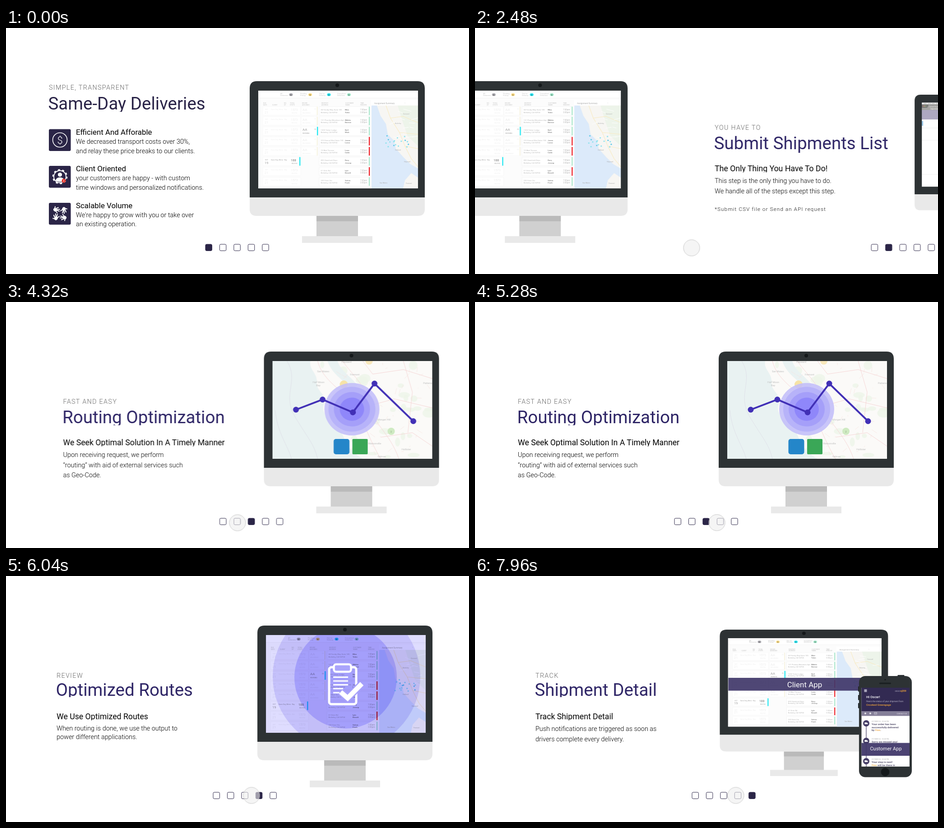
An HTML page for the animation above (8000 ms loop, 1026 px wide and 546 px high).

```html
<!DOCTYPE html>
<html lang="en">
<head>
<meta charset="utf-8">
<title>Delivery slides</title>
<style>
html, body { margin: 0; width: 100%; height: 100%; overflow: hidden; background: #fff; }
#stage { position: relative; width: 1026px; height: 546px; overflow: hidden; background: #fff; }
#track { position: absolute; left: 0; top: 0; width: 5130px; height: 546px; font-family: Roboto, sans-serif; animation: track 8s infinite; }
#cursor {
  position: absolute; left: -18.5px; top: -18.5px; width: 37px; height: 37px; box-sizing: border-box;
  border: 1px solid #c6c6c6; border-radius: 50%; background: rgba(238, 238, 238, .6);
  animation: cursor 8s infinite;
}
@keyframes track {
  0%, 29.515% { transform: translateX(0); }
  34.015%, 50.515% { transform: translateX(-1026px); }
  55.015%, 71.764% { transform: translateX(-2052px); }
  76.264% { transform: translateX(-3078px); }
  /* the last slide is cut off shortly before it settles */
  96.1125% { transform: translateX(-3078px); animation-timing-function: cubic-bezier(.271, .0945, .2885, .896); }
  100% { transform: translateX(-4092.8px); }
}
@keyframes cursor {
  0%, 4.375% { transform: translate(975px, -40px); animation-timing-function: ease-out; }
  6.5%, 8% { transform: translate(524.5px, 292.5px); animation-timing-function: ease-in-out; }
  13% { transform: translate(476.5px, 509.5px); animation-timing-function: ease-in-out; }
  16.5%, 20% { transform: translate(480.5px, 489.5px); }
  21.5%, 38% { transform: translate(479.5px, 487.5px); }
  40.5%, 44% { transform: translate(517.5px, 491.5px); }
  46%, 59% { transform: translate(512.5px, 489.5px); }
  64%, 65.5% { transform: translate(534.5px, 489.5px); }
  70%, 78% { transform: translate(543.5px, 486.5px); }
  82.5%, 88% { transform: translate(568.5px, 489.5px); }
  92.5%, 100% { transform: translate(577.5px, 486.5px); }
}
.multiply { mix-blend-mode: multiply; }
</style>
</head>
<body>
<div id="stage">
  <svg id="track" viewBox="0 0 5130 546"></svg>
  <div id="cursor"></div>
</div>
<script>
const INK = '#2b2547', TITLE = '#2e2566';

const text = (x, y, size, str, fill = '#222', weight = 400, more = '') =>
  `<text x="${x}" y="${y}" font-size="${size}" fill="${fill}" font-weight="${weight}" ${more}>${str}</text>`;
const rect = (x, y, w, h, fill, rx = 0, more = '') =>
  `<rect x="${x}" y="${y}" width="${w}" height="${h}" fill="${fill}" rx="${rx}" ${more}/>`;
const circle = (x, y, r, fill, more = '') => `<circle cx="${x}" cy="${y}" r="${r}" fill="${fill}" ${more}/>`;
const path = (d, fill, stroke = 'none', width = 1, more = '') =>
  `<path d="${d}" fill="${fill}" stroke="${stroke}" stroke-width="${width}" ${more}/>`;
const group = (transform, body, more = '') => `<g transform="${transform}" ${more}>${body}</g>`;
const centred = 'text-anchor="middle"';

let seed = 11;
const rnd = () => (seed = seed * 16807 % 2147483647) / 2147483647;

// Wording shared by all slides
const label = (y, str) => text(95, y, 14.4, str, '#666', 300, 'letter-spacing="1.3"');
const body = (x, y, str) => text(x, y, 14.4, str, '#000', 300);
const heading = (y, str, cut, fill = TITLE) =>
  text(93.5, y, 38.5, str, fill) + (cut ? rect(90, cut, 420, 10, '#fff') : '');
const subhead = str => text(95, 318, 17.7, str, '#000') + rect(90, 320.3, 420, 5, '#fff');

const dots = active => [0, 1, 2, 3, 4].map(i =>
  rect(442 + i * 31.45, 480, 14.4, 14.4, i === active ? INK : 'none', 2.5, `stroke="${INK}" stroke-width="1"`)).join('');

// Monitor of 388 x 359 with its screen at 19,21
const monitor = (x, y, sx, sy, screen) => group(`translate(${x} ${y}) scale(${sx} ${sy})`,
  rect(148, 299, 92, 46, '#d0d0d0') + rect(148, 299, 92, 12, '#bababa') + rect(116, 344, 156, 15, '#e9e9e9') +
  path('M0 258V16Q0 0 16 0H372Q388 0 388 16V258z', '#2d3234') +
  path('M0 258H388V284Q388 299 373 299H15Q0 299 0 284z', '#e9e9e9') +
  circle(194, 9, 4, '#14181a') + rect(19, 21, 354, 217, '#fff') +
  `<g clip-path="url(#screen)">${screen}</g>`);

const bayMap = () => {
  let s = rect(810, 172, 103, 184, '#f7f6f3');
  s += path('M868 172L913 172V262L890 240L878 205z', '#edf4ea');
  s += path('M810 172H822L830 195L842 213L846 236L860 250L864 268L880 286L896 302L913 312V332L898 322L884 338L880 356H810z', '#dceafa');
  s += path('M842 172L852 200L872 232L884 262L898 290L913 308M852 200L880 196L913 210M872 232L913 236M884 262L913 268', 'none', '#f9ebc2', 1.1);
  for (let i = 0; i < 14; i++) s += path(`M${850 + rnd() * 50} ${178 + rnd() * 80}l${8 + rnd() * 10} ${rnd() * 12 - 5}`, 'none', '#fff', 1);
  for (let i = 0; i < 17; i++) s += circle(842 + rnd() * 50, 238 + rnd() * 26, 1.6, i % 4 ? '#8fe3ee' : '#5fc9e8');
  [['Concord', 880, 192], ['Berkeley', 862, 213], ['Oakland', 862, 272], ['Hayward', 882, 298], ['San Mateo', 828, 345], ['Fremont', 886, 346]]
    .forEach(([n, x, y]) => s += text(x, y, 3.6, n, '#aaa'));
  return s;
};

const streets = ['68 Fernby Way Suite 185', '121 Plumley Meadows Apt. 200', '1203 Tolver Lodge', '915 Dunnel Blvd Suite 190', '10 Marl Terrace', '895 Hazelcott Keys', '61 Orrin Rd', '220 Vane Via'];
const people = ['Mira Tolen', 'Odette Barrow', 'Nell Wick', 'Jonas Lorne', 'Lena Cobb', 'Rory Jessop', 'Lyle Brandt', 'Selma Finch'];

const dashboard = () => {
  const pale = '#c2c2c2';
  let s = rect(559, 155, 354, 201, '#fcfcfc') + rect(559, 155, 354, .6, '#efefef');
  [['All', 'Deliveries', 608, '#a9a8ae'], ['Pending', 'Pickup', 652, '#f8d983'], ['Out for', 'Delivery', 694, '#25e2ee'], ['Completed', 'Deliveries', 734, '#9be3c4']]
    .forEach(([a, b, x, col], i) => {
      const cx = [631.5, 674, 715.5, 760][i];
      s += text(x, 146.5, 4, a, pale) + text(x, 150.5, 4, b, pale) + rect(cx - 4, 145, 8, 6, col, 3) + text(cx, 149.6, 4, '6', '#444', 700, centred);
    });
  [['DUE', 'DATE', 570], ['', 'CLIENT', 590], ['NO.', 'OF', 616], ['TOTAL', 'STOPS', 629], ['DRIVER', 'ASSIGNED', 656], ['DROPOFF', 'ADDRESS', 699], ['CUSTOMER', 'NAME', 752], ['TIME', 'WINDOW', 785]]
    .forEach(([a, b, x]) => s += text(x, 168, 3.5, a, pale) + text(x, 171.5, 3.5, b, pale));
  for (let i = 0; i < 8; i++) {
    const y = 184 + i * 22.4, on = i === 5, picked = i === 2;
    s += rect(569, y - 9.5, 84, 19, '#fff', 0, `stroke="#f5f5f5" stroke-width=".6"`);
    s += `<g opacity="${on ? .5 : .09}">` + text(574, y - 2, 3.6, on ? 'OCT' : 'SEP', '#444') + text(573, y + 5.5, 7.5, on ? 19 : 21, '#444') +
      text(587, y - 2, 3.6, 'Same Day, Metro - Bay', '#444') + text(631, y - .5, 7, on ? 188 : 1573, '#444', on ? 700 : 400) + text(633, y + 6, 3.4, 'ROUTES', '#444') + '</g>';
    if (on) s += rect(650, y - 9.5, 2.4, 19, '#25e8f2');
    if (i < 5) {
      s += rect(654, y - 9.5, 36, 19, '#fff', 0, `stroke="#f5f5f5" stroke-width=".6"`) +
        `<g opacity="${picked ? .5 : .1}">` + text(657, y - .5, 8, 'AA', '#444') + text(657, y + 6, 3.5, picked ? 'WORKING' : 'DELIVERED', '#444') + text(683, y - 3, 3.4, '24', '#444') + '</g>';
      s += rect(689, y - 9.5, picked ? 2.4 : 1, 19, picked ? '#25e8f2' : '#f3ecc8');
    }
    const [first, last] = people[i].split(' '), late = [3, 4, 6].includes(i);
    s += rect(694, y - 9.5, 110, 19, '#fff', 0, `stroke="#f1f1f1" stroke-width=".7"`);
    s += text(697.5, y - .6, 4.3, streets[i], '#b4b4b4') + text(697.5, y + 4.6, 4.3, 'Berkeley, CA 94704', '#b4b4b4');
    s += text(751, y - .6, 4.4, first, '#8c8c8c', 700) + text(751, y + 4.6, 4.4, last, '#8c8c8c', 700);
    s += text(785, y - .6, 4.6, '7:00am', '#b4b4b4') + text(785, y + 4.6, 4.6, '3:00pm', '#b4b4b4');
    s += rect(804, y - 9.5, 2.2, 19, late ? '#f01820' : '#a9e8cb');
  }
  s += rect(809, 160, 104, 12, '#fff') + text(816, 169, 4.6, 'Assignment Summary', '#aaa') + text(882, 169, 4.6, '⌃', '#ccc');
  return s + bayMap();
};
const dash = () => group('translate(-540 -118)', dashboard());

const featureIcon = y => rect(95, y, 48.5, 48.5, INK, 3);
const hand = angle => group(`rotate(${angle} 119.5 412)`,
  `<ellipse cx="109" cy="403.5" rx="4.2" ry="3.6" transform="rotate(35 109 403.5)" fill="#fff"/>` +
  path('M110 401L116 398.5M112 403L119 402.5M112 404.5L118 406.5M110 406L113.5 410.5M108 401L109 396.5', 'none', '#fff', 2, 'stroke-linecap="round"'));

const overview = () =>
  label(137, 'SIMPLE, TRANSPARENT') + heading(181, 'Same-Day Deliveries', 186, '#2a2448') +
  featureIcon(224.5) + circle(119.5, 248.5, 16, 'none', 'stroke="#fff" stroke-width="1.6"') + text(119.5, 256.5, 22, '$', '#fff', 300, centred) +
  featureIcon(306) + circle(119.5, 330, 13.5, 'none', 'stroke="#fff" stroke-width="1.8"') +
  circle(119.5, 330, 15.3, 'none', 'stroke="#fff" stroke-width="3" stroke-dasharray="4.5 5.1"') +
  circle(119.5, 325.5, 4.6, '#fff') + path('M110 339Q111 331.5 119.5 331.5T129 339Q119.5 344 110 339z', '#fff') +
  circle(128, 339, 4.5, '#e2382f') + text(128, 341.7, 7, '!', '#fff', 700, centred) +
  featureIcon(388) + [0, 90, 180, 270].map(hand).join('') +
  text(155, 236.5, 16.9, 'Efficient And Afforable', '#000') +
  body(155, 257, 'We decreased transport costs over 30%,') + body(155, 277.5, 'and relay these price breaks to our clients.') +
  text(155, 318, 16.9, 'Client Oriented', '#000') +
  body(155, 338, 'your customers are happy - with custom') + body(155, 358.5, 'time windows and personalized notifications.') +
  text(155, 399.5, 16.9, 'Scalable Volume', '#000') +
  body(155, 419.5, "We're happy to grow with you or take over") + body(155, 440, 'an existing operation.') +
  monitor(540, 118, 1, 1, dash()) + dots(0);

const uploadPage = () => {
  let s = rect(554, 165.5, 298, 4, '#f2f2f2') + rect(554, 169.5, 298, 8, '#777775') + rect(554, 177, 298, 5, '#a3a3a1');
  s += path('M566 177L569 170.5H599L603 177z', '#a3a3a1') + rect(572, 178, 265, 3, '#b9b9b7', 1);
  ['#d98c86', '#dcc583', '#93c08c'].forEach((col, i) => s += circle(557 + i * 3, 173.3, 1.1, col));
  for (let i = 0; i < 10; i++) s += rect(558 + i * 9, 167, 5 + rnd() * 3, 1.2, '#b5b5b5') + (i < 8 ? rect(757 + i * 12, 167, 3 + rnd() * 4, 1.2, '#aaa') : '');
  s += text(571, 175.5, 3.2, 'Upload Shipments', '#eee') + text(574, 180.6, 3, 'https://client.example/upload/shipments', '#eee');
  s += rect(554, 182, 298, 21, '#aea8c1') + text(809.5, 194, 4.6, 'ACCOUNT', '#fff') + text(841.5, 194.5, 6, '⚑', '#fff');
  s += path('M799 189.5H802.3L804 191.3V195.5H799z', 'none', '#fff', .7) + rect(554, 206.5, 3, 10.5, '#9ccbec');
  s += path('M554 222H641.5V352M554 249H641M554 325H641M647 352V226.5H852', 'none', '#ececec', .8);
  s += text(653, 243.5, 6.2, 'Upload Shipments', '#999') + text(653, 252.5, 4.4, 'Instructions:', '#888', 700);
  s += text(653, 259, 4.25, 'Upload a CSV file with delivery locations to calculate an optimized delivery route. Download sample', '#999');
  s += text(653, 265.5, 4.25, 'CSV files: <tspan fill="#6db3e6">Click an address</tspan>', '#999');
  s += text(727, 280.5, 4.3, 'America/Los_Angeles', '#999') + rect(684.5, 291, 167, 27, '#fafafa', 0, 'stroke="#ddd" stroke-width=".6" stroke-dasharray="1.5 1.2"');
  return s + text(733, 306.5, 5.2, 'Drop Files Here', '#777');
};

const submit = () => {
  let s = label(225.5, 'YOU HAVE TO') + heading(269, 'Submit Shipments List') + subhead('The Only Thing You Have To Do!');
  s += body(95, 344, 'This step is the only thing you have to do.') + body(95, 366.5, 'We handle all of the steps except this step.');
  s += text(95, 406, 11.6, '*Submit CSV file or Send an API request', '#111', 300, 'letter-spacing="1.15"');
  s += monitor(538, 148, .843, .858, '') + uploadPage();
  [[29.2, '#a9c4f2'], [23.5, '#84abec'], [19.5, '#6896e6'], [13, '#3f7add']].forEach(([r, col]) => s += circle(788, 300, r, col, 'fill-opacity=".95"'));
  s += path('M790 302H856.5M877 269H856.5V332.5H877', 'none', '#2f6fd0', 1) + circle(878, 269, 1.8, '#2758b8') + circle(877.5, 332.5, 1.8, '#2758b8');
  s += rect(881.5, 245, 48.5, 48.5, '#8a80fc', 5) + path('M891 251H913L920 258V287.5H891z', '#fff') + path('M913 251V258H920z', '#c9c5f5');
  s += path('M894.5 256.5H909M894.5 261H917M894.5 265.5H917', 'none', '#999', 1.3) + text(905.3, 282.5, 9.5, 'CSV', '#111', 700, centred);
  s += rect(881.5, 307, 48.5, 48.5, '#8a80fc', 5) + rect(893, 318, 26.5, 28, '#fff') + text(906.5, 341, 11.5, 'API', '#111', 500, centred);
  return s + dots(1);
};

const regionMap = () => {
  let s = rect(590, 131, 354, 217, '#fbfaf8');
  for (let i = 0; i < 34; i++) {
    const x = 700 + rnd() * 240, y = 135 + rnd() * 210;
    s += `<ellipse cx="${x}" cy="${y}" rx="${4 + rnd() * 10}" ry="${3 + rnd() * 8}" fill="#eef5e9" opacity=".8"/>`;
  }
  s += path('M590 131H674C670 150 690 158 688 178S712 205 704 226S716 262 735 280S745 322 790 348H590z', '#e9f2f2');
  s += path('M712 131H734C742 155 765 165 778 186L764 191C745 172 722 160 712 131z', '#e9f2f2');
  s += path('M622 131C650 175 610 205 640 255S682 315 690 348M596 240C600 290 625 320 632 348', 'none', '#dcdce6', .8);
  s += path('M690 131C700 170 735 190 760 215S800 300 830 348M745 131C770 165 800 190 806 230S850 290 870 348M790 131L812 160L880 150L944 170M806 230L860 215L944 235M760 215L806 230M830 300L900 290L944 320M880 131L900 200L890 290', 'none', '#f5d3d3', .9);
  for (let i = 0; i < 40; i++) s += path(`M${730 + rnd() * 205} ${135 + rnd() * 200}l${rnd() * 24 - 12} ${rnd() * 22 - 8}`, 'none', '#f6e2de', .7);
  [['Hayward', 743, 135], ['San Mateo', 689, 156], ['Fremont', 762, 163], ['Half Moon', 679, 180], ['Bay', 687, 187], ['Morgan Hill', 823, 263], ['Watsonville', 802, 316], ['Hollister', 876, 329], ['Salinas', 823, 345], ['Patterson', 924, 182]]
    .forEach(([n, x, y]) => s += text(x, y, 5.6, n, '#bdbdbd'));
  return s + circle(748, 183, 9, '#f6e3a6') + circle(804, 131, 8, '#f8e8bb') + circle(853, 287, 8, '#cfeac2') + text(853, 289.5, 6, '2', '#8aa880', 400, centred);
};

const routing = () => {
  const stops = [[642, 239], [701, 216.5], [768, 245], [816, 181], [902, 264.5]];
  let s = regionMap();
  [[61, '#c3bffa'], [52, '#b6b1fa'], [40, '#a39dfa'], [27, '#8c85fb']].forEach(([r, col]) =>
    s += `<ellipse cx="766" cy="238" rx="${r}" ry="${r * .955}" fill="${col}" opacity=".88"/>`);
  s += path('M' + stops.join('L'), 'none', '#4130b6', 4) + stops.map(([x, y]) => circle(x, y, 6.5, '#4130b6')).join('');
  s += rect(725.5, 304, 35, 34, '#2486c9', 5) + rect(767, 304, 34, 34, '#3aa757', 2);
  return label(225.5, 'FAST AND EASY') + heading(269, 'Routing Optimization', 273.5) + subhead('We Seek Optimal Solution In A Timely Manner') +
    body(95, 344, 'Upon receiving request, we perform') + body(95, 366.5, '“routing” with aid of external services such') + body(95, 389, 'as Geo-Code.') +
    monitor(540, 110, 1, 1, group('translate(-571 -110)', s)) + dots(2);
};

const review = () => {
  let s = rect(559, 131, 354, 217, '#dfddff', 0, 'class="multiply"') + circle(737.5, 223, 163.5, '#e2dffb', 'class="multiply"') + circle(735.5, 225, 113.5, '#d5d2ff', 'class="multiply"');
  s += rect(699, 202.5, 60, 82, 'none', 5, 'stroke="#fff" stroke-width="5"') + rect(709.5, 196, 38, 16.5, '#aaa4fb', 5, 'stroke="#fff" stroke-width="4.5"');
  s += path('M708 224.5H741M708 233H741M708 241.5H741M708 250H730M708 259H722', 'none', '#fff', 3);
  const tick = 'M724.5 257.5L740 271L771.5 239';
  s += path(tick, 'none', '#a7a1fb', 16) + path(tick, 'none', '#fff', 10.5);
  return label(225.5, 'REVIEW') + heading(266, 'Optimized Routes', 268.8) + subhead('We Use Optimized Routes') +
    body(95, 343, 'When routing is done, we use the output to') + body(95, 361.5, 'power different applications.') +
    monitor(540, 110, 1, 1, dash() + group('translate(-540 -110)', s)) + dots(3);
};

const phone = () => {
  const orange = '#f0a63c', dark = '#4a4563';
  let s = [245, 264, 282].map(y => rect(850.5, y, 4, 11.5, '#22272a', 1)).join('') + rect(938, 219.8, 15, 4, '#22272a', 1);
  s += rect(852.5, 222, 117, 224.5, '#2d3234', 14) + circle(910.5, 230, 1.6, '#14181a') + rect(897.5, 236.5, 26, 3.6, '#1b2022', 1.8) + circle(910.5, 435, 9.3, '#14181a');
  s += rect(858, 248, 106.5, 175, '#fff') + rect(858, 248, 106.5, 52, '#322a52');
  s += rect(864, 251.5, 6, 6, '#aaa6bb') + text(932, 256.5, 3.6, 'ORDER', '#b5b1c4') + text(944, 257, 5.2, 'nj359', orange, 700);
  s += text(868.5, 271, 7.4, 'Hi Oscar!', '#fff', 500) + text(868.5, 279.5, 4.7, "Here's the status of your shipment from", '#b5b1c4') + text(868.5, 287.5, 6.2, 'Crooked Greengage', orange, 500);
  s += rect(858, 300, 106.5, 10.5, '#857f99') + circle(866.5, 305, 2, '#e6e4ec') + circle(877.5, 305, 2, '#e6e4ec');
  s += path('M886.5 303H892V307H886.5zL889.2 305.3L892 303', 'none', '#e6e4ec', .6) + text(936, 306.5, 3.8, 'CONTACT US', '#e6e4ec');
  s += rect(867.8, 320, 1.4, 103, '#5b5575');
  [[327, ['Your order has been', 'successfully delivered', `by <tspan fill="${orange}">Finn</tspan>.`]],
    [366, ['Sorry we missed you!']],
    [411, ['Your stop is next!', `<tspan fill="${orange}">Finn</tspan> will be there in`]]]
    .forEach(([y, lines]) => {
      s += circle(868.5, y, 7, '#453d66') + rect(865, y - 2, 5, 4, '#fff') + rect(870, y - .8, 2, 2.8, '#fff');
      s += text(880.5, y - 3.5, 3.5, 'OCTOBER 26 - 02:46 PM', '#aaa');
      lines.forEach((line, i) => s += text(880.5, y + 4 + i * 6.6, 6, line, dark, 500));
    });
  s += rect(858, 370.5, 106.5, 28.5, '#40386a', 0, 'opacity=".94"');
  return s + text(912, 386.5, 11, 'Customer App', '#fff', 400, centred);
};

const track = () =>
  label(225.5, 'TRACK') + heading(266, 'Shipment Detail', 268.8) + subhead('Track Shipment Detail') +
  body(95, 344, 'Push notifications are triggered as soon as') + body(95, 366.5, 'drivers complete every delivery.') +
  monitor(503.5, 119, .961, .905, dash()) +
  group('translate(-40.5 0)', rect(563, 226, 339, 28.5, '#40386a', 0, 'opacity=".92"') +
    text(732, 246.5, 17, 'Client App', '#fff', 400, centred) + phone()) + dots(4);

document.getElementById('track').innerHTML =
  '<defs><clipPath id="screen"><rect x="19" y="21" width="354" height="217"/></clipPath></defs>' +
  [overview, submit, routing, review, track].map((slide, i) => group(`translate(${i * 1026} 0)`, slide())).join('');
</script>
</body>
</html>
```
